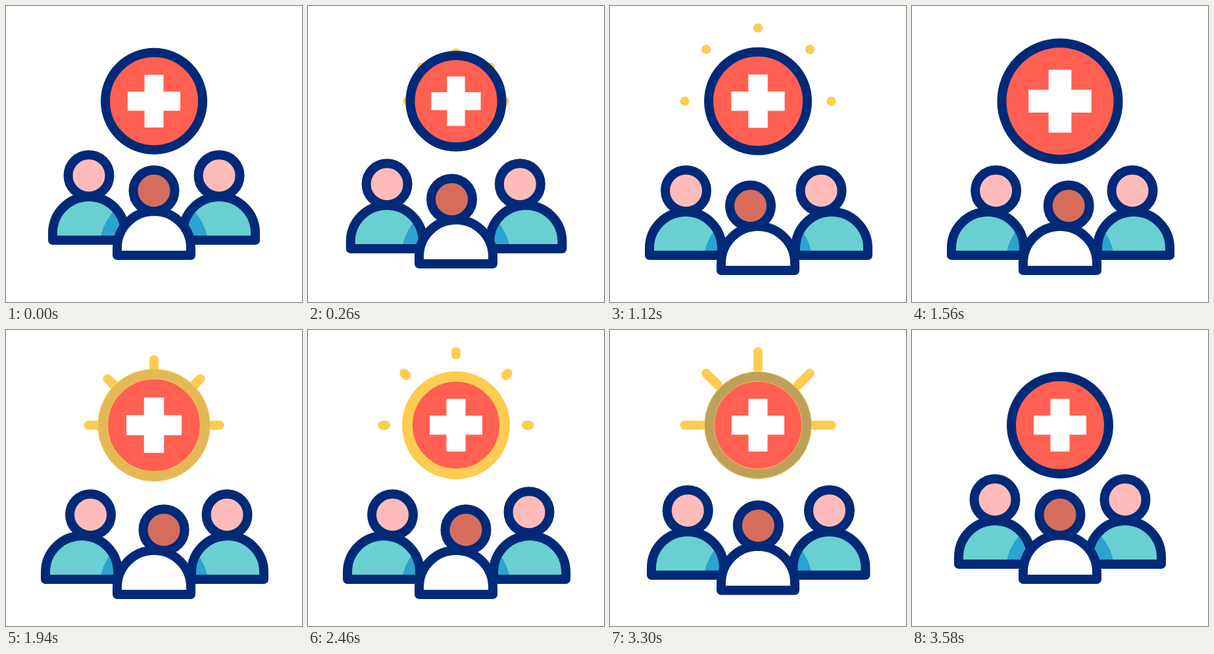
Recreate the animation shown at these times as an HTML page with a canvas. Size 450x450 px, loop 3600 ms.

```html
<!DOCTYPE html>
<html>
<head>
<meta charset="utf-8">
<style>
  html, body { margin: 0; overflow: hidden; background: #fff; }
  canvas { display: block; }
</style>
</head>
<body>
<canvas id="stage" width="450" height="450"></canvas>
<script>
const ctx = document.getElementById('stage').getContext('2d');
const LOOP = 3600;
const NAVY = '#002a78', RED = '#ff6052', YELLOW = '#ffcc52', TEAL = '#69cfd1';
const BLUE = '#2ba3d0', PINK = '#ffbbb9', BROWN = '#d66d5c', WHITE = '#fff';

// spread: sideways body travel; looks: head offset for each gaze direction
const people = [
  { x: 126, y: 356, r: 55, spread: -11, looks: [0.5, 13.5], skin: PINK, shirt: TEAL },
  { x: 324, y: 356, r: 55, spread: 13, looks: [-16, -1], skin: PINK, shirt: TEAL },
  { x: 225, y: 379, r: 56, spread: 0, looks: [-11.5, 15], skin: BROWN, shirt: WHITE }
];

// Rays grow outwards, then their inner ends follow until only dots remain
const bursts = [
  { grow: [150, 480], shrink: [620, 1100] },
  { grow: [1700, 2050], shrink: [2100, 2540] },
  { grow: [2700, 3030], shrink: [3060, 3540] }
];
const RAY_START = 60, RAY_END = 111.5;

function ease(t, from, to) {
  const p = Math.min(1, Math.max(0, (t - from) / (to - from)));
  return p * p * (3 - 2 * p);
}
const mix = (a, b, p) => a + (b - a) * p;

function paint(path, fill, stroke = NAVY, width = 14) {
  if (fill) {
    ctx.fillStyle = fill;
    ctx.fill(path);
  }
  ctx.strokeStyle = stroke;
  ctx.lineWidth = width;
  ctx.stroke(path);
}

function circle(x, y, r) {
  const path = new Path2D();
  path.arc(x, y, r, 0, 2 * Math.PI);
  return path;
}

function torso(x, y, r) {
  const path = new Path2D();
  path.moveTo(x - r, y);
  path.arc(x, y - 11, r, Math.PI, 0);
  path.lineTo(x + r, y);
  path.closePath();
  return path;
}

function drawPerson(person, t) {
  const away = ease(t, 0, 480) - ease(t, 3160, 3570);
  const x = person.x + person.spread * away;
  const y = person.y + 23 * away;
  const [first, second] = person.looks;
  const look = first * ease(t, 0, 480) + (second - first) * ease(t, 1140, 1640)
    - second * ease(t, 2750, 3350);
  const nod = person.spread > 0 ? 4 * (ease(t, 2250, 2440) - ease(t, 2480, 2680)) : 0;

  const body = torso(x, y, person.r);
  ctx.fillStyle = person.shirt;
  ctx.fill(body);
  if (person.spread) {
    ctx.save();
    ctx.clip(body);
    ctx.fillStyle = BLUE;
    ctx.fill(circle(225, 368 + 23 * away, 83));
    ctx.restore();
  }
  paint(body);
  paint(circle(x + look, y - 98.3 - nod, 31.5), person.skin);
}

function drawRays(t) {
  for (const { grow, shrink } of bursts) {
    if (t < grow[0] || t > shrink[1] + 30) continue;
    const outer = mix(RAY_START, RAY_END, ease(t, ...grow));
    const inner = mix(RAY_START, RAY_END - 0.1, ease(t, ...shrink));
    for (let i = 0; i < 5; i++) {
      const angle = Math.PI * (1 + i / 4);
      const c = Math.cos(angle), s = Math.sin(angle);
      const ray = new Path2D();
      ray.moveTo(inner * c, inner * s);
      ray.lineTo(outer * c, outer * s);
      paint(ray, null, YELLOW);
    }
  }
}

function drawBadge(t) {
  const scale = 1 - 0.175 * ease(t, 40, 600) + 0.375 * ease(t, 620, 1620)
    - 0.2 * ease(t, 1620, 2100);
  const ring = circle(0, 0, 74 * scale);
  ctx.save();
  ctx.translate(225, 144.7);
  drawRays(t);
  paint(ring, RED);
  ctx.globalAlpha = ease(t, 1720, 2000) - ease(t, 3200, 3500);
  paint(ring, null, YELLOW, 16);
  ctx.globalAlpha = 1;
  ctx.scale(scale, scale);
  ctx.fillStyle = WHITE;
  ctx.fillRect(-40, -14.5, 80, 29);
  ctx.fillRect(-14.5, -40, 29, 80);
  ctx.restore();
}

function frame() {
  const t = performance.now() % LOOP;
  ctx.fillStyle = WHITE;
  ctx.fillRect(0, 0, 450, 450);
  ctx.lineCap = ctx.lineJoin = 'round';
  drawBadge(t);
  for (const person of people) drawPerson(person, t);
  requestAnimationFrame(frame);
}
frame();
</script>
</body>
</html>
```
